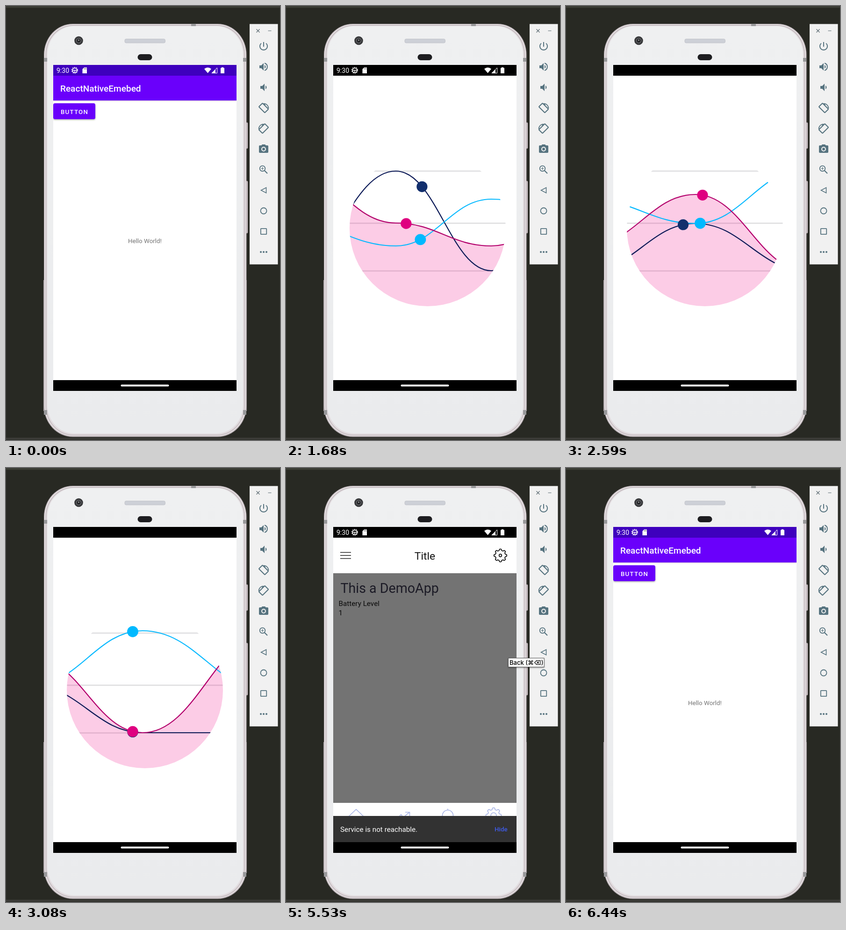
Animation, 586 px wide and 928 px high, one loop 7.28 s. Source, as an HTML page:

```html
<!DOCTYPE html>
<html lang="en">
<head>
<meta charset="utf-8">
<title>Phone demo</title>
<style>
html, body { margin: 0; width: 100%; height: 100%; overflow: hidden; background: #282923; }
svg { display: block; width: 100vw; height: 100vh; }
text { font-family: Roboto, sans-serif; }
.line { fill: none; stroke-width: 2.2; }
.icon { fill: #56737f; }
.outline { fill: none; stroke: #56737f; stroke-width: 1.8; }
.tab { fill: none; stroke: #aab6e6; stroke-width: 1.7; }
</style>
</head>
<body>
<svg viewBox="0 0 586 928" preserveAspectRatio="none">
  <defs>
    <clipPath id="screen"><rect x="101" y="126" width="392" height="697"/></clipPath>
    <clipPath id="disc"><circle cx="297" cy="475" r="167"/></clipPath>
    <filter id="soft" x="-20%" y="-40%" width="140%" height="200%">
      <feDropShadow dx="0" dy="1.5" stdDeviation="1.5" flood-opacity=".35"/>
    </filter>
    <linearGradient id="shell" x1="0" y1="0" x2="0" y2="1">
      <stop offset="0" stop-color="#eff0f1"/><stop offset="1" stop-color="#eaebed"/>
    </linearGradient>
  </defs>

  <!-- desktop -->
  <rect width="586" height="928" fill="#282923"/>
  <rect width="586" height="4" rx="2" fill="#3b3d35"/>
  <rect y="923" width="586" height="4" fill="#3b3b37"/>

  <!-- phone body -->
  <g fill="#d8d0d3" stroke="#8d8589" stroke-width=".8">
    <rect x="511" y="249" width="6" height="56" rx="2"/>
    <rect x="511" y="374" width="6" height="112" rx="2"/>
  </g>
  <rect x="80" y="586" width="435" height="280" fill="#a9a1a5"/>
  <rect x="81" y="38" width="433.5" height="883.5" rx="62" ry="66" fill="#a9a1a5"/>
  <rect x="82" y="39" width="431.5" height="881" rx="61" ry="65" fill="#e3dcdf"/>
  <rect x="85" y="41" width="425.5" height="877" rx="59" ry="63" fill="#b3abaf"/>
  <rect x="86" y="42" width="423.5" height="875" rx="58" ry="62" fill="#e2dcdf"/>
  <rect x="88.5" y="43" width="418.5" height="871" rx="57" ry="61" fill="url(#shell)"/>
  <path d="M81 111h7v8h-7zM507 111h7v8h-7zM81 864h7v10h-7zM507 864h7v10h-7zM396 38h10v5h-10z" fill="#98989a"/>
  <circle cx="155.5" cy="74" r="9.3" fill="#38393b"/>
  <circle cx="155.5" cy="74" r="5" fill="#222326" stroke="#696a6d" stroke-width="1.5"/>
  <circle cx="155.5" cy="73" r="1.5" fill="#999"/>
  <rect x="254" y="70.5" width="86.5" height="8.5" rx="3" fill="#cdd0d7" stroke="#bbbec5" stroke-width=".8"/>
  <rect x="281.5" y="103" width="31" height="13" rx="6.5" fill="#1d1d20"/>

  <!-- screen -->
  <g clip-path="url(#screen)">
    <rect x="101" y="126" width="392" height="697" fill="#fff"/>
    <g id="home">
      <rect x="50" y="202" width="494" height="1.5" fill="#ddd"/>
      <rect x="50" y="149" width="494" height="53" fill="#6a00fb"/>
      <text x="116" y="183" font-size="19.06" font-weight="500" fill="#fff">ReactNativeEmebed</text>
      <rect x="101" y="208" width="90" height="34" rx="3.8" fill="#6a00fb" filter="url(#soft)"/>
      <text x="117" y="230.5" font-size="13.35" font-weight="500" letter-spacing="1.19" fill="#fff">BUTTON</text>
      <text x="297" y="506.5" font-size="13.35" text-anchor="middle" fill="#757575">Hello World!</text>
    </g>

    <g id="app">
      <rect x="101" y="149" width="392" height="651" fill="#fff"/>
      <g id="chart">
        <g clip-path="url(#disc)">
          <path d="M182 353H412M130 464.5H464M157 566.5H437" stroke="#e2e2e4" stroke-width="3" stroke-linecap="round"/>
          <path id="area" fill="rgba(240,0,130,.2)"/>
          <path id="navy" class="line" stroke="#0d1b58"/>
          <path id="cyan" class="line" stroke="#05b9ff"/>
          <path id="pink" class="line" stroke="#b3006c"/>
        </g>
        <circle id="navyDot" r="11.6" fill="#122f6d"/>
        <circle id="cyanDot" r="11.9" fill="#00b9ff"/>
        <circle id="pinkDot" r="11.6" fill="#df0080"/>
      </g>
      <g id="demo">
        <path d="M116 180.5h23M116 187h23M116 193.5h23" stroke="#222" stroke-width="1.3"/>
        <text x="297" y="196" font-size="22.9" text-anchor="middle" fill="#111">Title</text>
        <path id="settings" fill="none" stroke="#111" stroke-width="1.8"/>
        <circle cx="458.5" cy="187" r="2.8" fill="none" stroke="#111" stroke-width="1.7"/>
        <rect x="101" y="225" width="392" height="491" fill="#737373"/>
        <text x="116.5" y="267" font-size="28.6" fill="#1c1b26">This a DemoApp</text>
        <g font-size="15.25" fill="#0a0a0a">
          <text x="112.5" y="295">Battery Level</text>
          <text x="112.5" y="315">1</text>
        </g>
        <g class="tab">
          <path d="M134 745L150 730L166 745M242 745L246 741L251 747L264 736M255 736H264.5V745"/>
          <path d="M334.5 746V743a11.5 11.5 0 0 1 23 0V746M346 731v-2.5"/>
          <path id="tabGear"/>
          <circle cx="444" cy="743" r="6"/>
        </g>
        <g id="snack">
          <rect x="101" y="744" width="392" height="56" fill="#323232"/>
          <text x="116" y="778" font-size="15.25" fill="#fff">Service is not reachable.</text>
          <text x="446" y="777" font-size="13.35" font-weight="500" fill="#3f5be8">Hide</text>
        </g>
      </g>
    </g>

    <rect id="status" x="101" y="126" width="392" height="23"/>
    <g id="statusIcons" fill="#fff">
      <text x="108" y="143" font-size="14">9:30</text>
      <circle cx="147" cy="137.5" r="4.8" fill="none" stroke="#fff" stroke-width="1.5"/>
      <circle cx="147" cy="137.5" r="6.3" fill="none" stroke="#fff" stroke-width="1.6" stroke-dasharray="2 1.96"/>
      <path d="M143 137.5h8M147 137.5v4" stroke="#fff" stroke-width="1.3"/>
      <path d="M163.5 135l3.500-3.500h6v12.500h-9.500z"/>
      <path d="M167.5 133v2.500M169.500 133v2.500M171.500 133v2.500" stroke="#333" stroke-width=".8"/>
      <path d="M424 134.500Q431.500 128.500 439 134.500L431.500 143.500z"/>
      <path d="M451.500 132V143.500H440z" fill="none" stroke="#fff"/>
      <path d="M448 135.500V143.500H440z"/>
      <path d="M459 132.500h2v-1.500h4v1.500h2V144h-8z"/>
    </g>
    <rect x="101" y="800" width="392" height="23"/>
    <rect x="245.5" y="809.5" width="103" height="4" rx="2" fill="#fff"/>
  </g>

  <!-- emulator toolbar -->
  <rect x="521" y="38.5" width="60.5" height="514" fill="#f1f1f1"/>
  <rect id="press" x="533" y="376" width="36" height="36" rx="2" fill="#dcdfe1"/>
  <path d="M535.5 49.5l7 7M542.5 49.5l-7 7M560.5 53h7" stroke="#56666e" stroke-width="1.2"/>
  <g class="icon">
    <path transform="translate(539 74)" d="M13 3h-2v10h2V3zm4.83 2.17l-1.42 1.42C17.99 7.86 19 9.81 19 12c0 3.87-3.13 7-7 7s-7-3.13-7-7c0-2.19 1.01-4.14 2.58-5.42L6.17 5.17C4.23 6.82 3 9.26 3 12c0 4.97 4.03 9 9 9s9-4.03 9-9c0-2.74-1.23-5.18-3.17-6.83z"/>
    <g transform="translate(539 118)">
      <path d="M3 9v6h4l5 5V4L7 9zM14 8a4.5 4.5 0 0 1 0 8z"/>
      <path d="M14 4.3a8 8 0 0 1 0 15.4" fill="none" stroke="#56737f" stroke-width="2"/>
    </g>
    <path transform="translate(539 162)" d="M5 9v6h4l5 5V4L9 9zM16 8a4.5 4.5 0 0 1 0 8z"/>
    <path transform="translate(539 294)" d="M9 2L7.200 4H4a2 2 0 0 0-2 2v12a2 2 0 0 0 2 2h16a2 2 0 0 0 2-2V6a2 2 0 0 0-2-2h-3.200L15 2zM12 17a5 5 0 1 1 0-10a5 5 0 0 1 0 10z"/>
    <circle cx="551" cy="306" r="3"/>
    <circle cx="545" cy="526" r="2"/><circle cx="551" cy="526" r="2"/><circle cx="557" cy="526" r="2"/>
  </g>
  <g class="outline">
    <g id="rotate" transform="translate(551 218)">
      <rect x="-9" y="-5.5" width="18" height="11" rx="1" transform="rotate(45)" stroke-width="2.1"/>
      <path d="M0 -9.5A10.500 10.500 0 0 1 10.500 1M0 -9.500L3.500 -6" stroke-width="1.6"/>
    </g>
    <use href="#rotate" transform="matrix(-1 0 0 1 1102 44)"/>
    <circle cx="548.5" cy="347.5" r="5.8"/>
    <path d="M552.7 351.7L559 358" stroke-width="2.2"/>
    <path d="M545.5 347.5h6M548.5 344.5v6" stroke-width="1.2"/>
    <path d="M556.5 388.3V399.7L545.5 394z" stroke-width="1.6"/>
    <circle cx="551" cy="438" r="6.5"/>
    <rect x="544.8" y="475.8" width="12.4" height="12.4" rx="1"/>
  </g>

  <g id="tip">
    <rect x="475.5" y="406.5" width="76.5" height="19" fill="#fff" stroke="#555" filter="url(#soft)"/>
    <text x="478" y="420.5" font-size="13" font-weight="500" style="font-family: Inter, 'DejaVu Sans', sans-serif">Back (⌘⌫)</text>
  </g>
</svg>

<script>
const LOOP = 7280, STEP = 70, SLIDE = 39, HANDLE = 0.42;
const $ = id => document.getElementById(id);
const clamp = v => Math.max(0, Math.min(1, v));
const ramp = (t, from, to) => clamp((t - from) / (to - from));
const within = (t, from, to) => t >= from && t < to;
const show = (id, on) => $(id).setAttribute('visibility', on ? 'visible' : 'hidden');
const shift = (id, x) => $(id).setAttribute('transform', `translate(${x} 0)`);
const settle = u => (1 - u) ** 3.7;

// Piecewise linear value through [time, value] pairs; open ends continue.
function track(t, keys, open) {
  let i = 0;
  while (i < keys.length - 2 && t > keys[i + 1][0]) i++;
  const [[t0, a], [t1, b]] = keys.slice(i);
  const u = (t - t0) / (t1 - t0);
  return a + (b - a) * (open ? u : clamp(u));
}

const scrollKeys = [[1680, 0], [2590, 385], [3080, 606]];
const knots = [0, 229, 433, 662, 898, 1174, 1400];
const series = {
  navy: { levels: [566, 353, 566, 465, 566, 566, 464], dot: [[1680, 285], [2590, 250.5], [3080, 271]] },
  cyan: { levels: [459, 513, 413, 465, 348, 480, 513], dot: [[1680, 281.5], [2590, 287], [3080, 271]] },
  pink: { levels: [346, 464, 513, 403, 566, 348, 464], dot: [[1680, 251], [2590, 292], [3080, 271]] }
};

// Horizontal tangents at every knot.
function curve(levels, scroll) {
  return knots.map((k, i) => {
    const x = k - scroll, y = levels[i];
    if (!i) return `M${x} ${y}`;
    const reach = (k - knots[i - 1]) * HANDLE;
    return `C${knots[i - 1] - scroll + reach} ${levels[i - 1]} ${x - reach} ${y} ${x} ${y}`;
  }).join('');
}

function height(levels, x, scroll) {
  let i = 0;
  while (i < knots.length - 2 && x + scroll > knots[i + 1]) i++;
  const u = clamp((x + scroll - knots[i]) / (knots[i + 1] - knots[i]));
  let lo = 0, hi = 1, s = 0.5;
  for (let n = 0; n < 16; n++) {
    const at = 3 * s * (1 - s) * ((1 - s) * HANDLE + s * (1 - HANDLE)) + s ** 3;
    if (at < u) lo = s; else hi = s;
    s = (lo + hi) / 2;
  }
  return levels[i] + (levels[i + 1] - levels[i]) * s * s * (3 - 2 * s);
}

function drawChart(t) {
  const scroll = track(t, scrollKeys, true);
  for (const [name, { levels, dot }] of Object.entries(series)) {
    const d = curve(levels, scroll), x = track(t, dot);
    $(name).setAttribute('d', d);
    if (name === 'pink') $('area').setAttribute('d', `${d}V650H${knots[0] - scroll}Z`);
    $(name + 'Dot').setAttribute('cx', x);
    $(name + 'Dot').setAttribute('cy', height(levels, x, scroll));
  }
}

function gear(cx, cy, r, depth) {
  let d = '';
  for (let a = 0; a < 360; a += 3) {
    const q = a * Math.PI / 180, s = r + depth * Math.tanh(2.5 * Math.cos(8 * q));
    d += `${d ? 'L' : 'M'}${(cx + s * Math.cos(q)).toFixed(2)} ${(cy + s * Math.sin(q)).toFixed(2)}`;
  }
  return d + 'Z';
}
$('settings').setAttribute('d', gear(458.5, 187, 12.2, 1.5));
$('tabGear').setAttribute('d', gear(444, 743, 14.5, 2));

function draw(t) {
  const closing = t >= 5740, loaded = t >= 3290;
  const leave = settle(ramp(t, 5740, 6160));
  show('home', t < 1610 || closing);
  shift('home', closing ? -SLIDE * leave : 0);

  $('app').setAttribute('opacity', closing ? 1 - ramp(t, 5670, 5880) : ramp(t, 1470, 1610));
  const offset = SLIDE * (closing ? 1 - leave : settle(ramp(t, 1500, 1950)));
  shift('chart', offset);
  shift('demo', offset);
  $('chart').style.display = loaded ? 'none' : '';
  $('demo').style.display = loaded ? '' : 'none';
  if (!loaded) drawChart(t);
  $('snack').setAttribute('opacity', ramp(t, 3290, 3500));

  $('status').setAttribute('fill', within(t, 1540, 5810) ? '#000' : '#3e00bd');
  show('statusIcons', !within(t, 1890, 3500));
  show('tip', within(t, 3500, 5740));
  show('press', within(t, 5110, 5250) || within(t, 5390, 5530));
}

const start = performance.now();
function frame() {
  const t = (performance.now() - start) % LOOP;
  draw(Math.floor(t / STEP) * STEP);
  requestAnimationFrame(frame);
}
frame();
</script>
</body>
</html>
```
